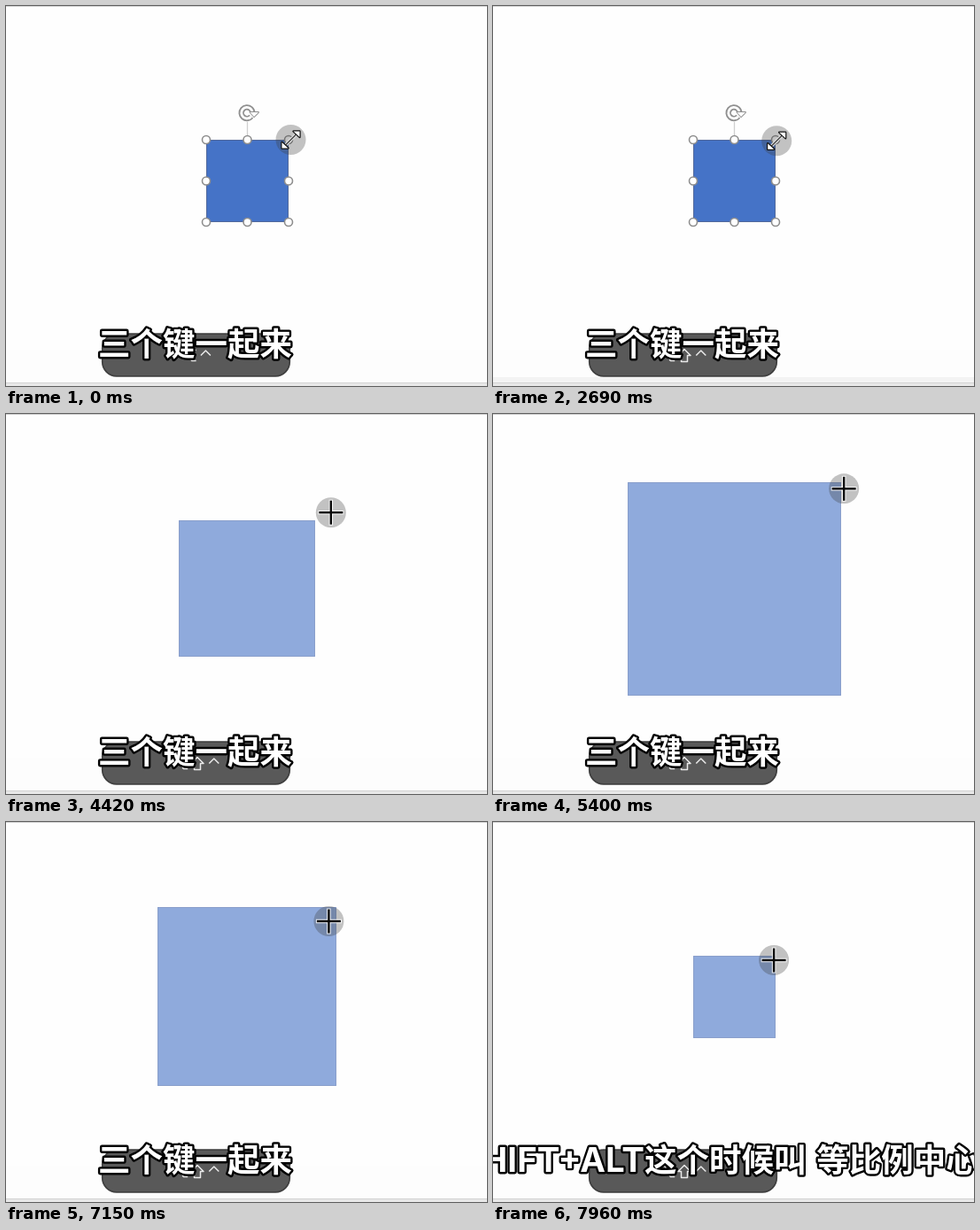
An HTML page with a canvas that plays this animation: 543x429 px, repeating every 7.99 s.

```html
<!DOCTYPE html>
<html lang="zh">
<head>
<meta charset="utf-8">
<style>
  html, body { margin: 0; width: 100%; height: 100%; overflow: hidden; background: #fefefe; }
  canvas { display: block; }
</style>
</head>
<body>
<canvas id="stage" width="543" height="429"></canvas>
<script>
const ctx = document.getElementById('stage').getContext('2d');
const LOOP = 7990;
const CENTER = { x: 272.5, y: 197.5 };
const SMALL = 46.5, GROWN = 113.5, LARGE = 133.5; // half sides of the square
const PRESS = 3750, DRAG = 4150, SLOW = 4800, TURN = 6490;
const CJK = '700 36.5px "Noto Sans CJK SC", "Noto Sans CJK", sans-serif';
const LATIN = '700 38.5px Inter, sans-serif';

const clamp = v => Math.min(1, Math.max(0, v));
const progress = (t, from, to) => clamp((t - from) / (to - from));
const mix = (a, b, k) => a + (b - a) * k;
const smooth = k => k * k * (3 - 2 * k);

function held(t) {
  const since = t < SLOW ? PRESS : t < TURN ? SLOW : TURN + 30;
  const still = t < DRAG || (t >= SLOW && t < 6000) || (t >= TURN + 30 && t < 7150);
  return still ? since + Math.floor((t - since) / 200) * 200 : t;
}

function halfSide(t) {
  if (t < DRAG) return SMALL;
  if (t < SLOW) return mix(SMALL, GROWN, progress(t, 4100, SLOW));
  if (t < TURN) return mix(GROWN, LARGE, progress(t, SLOW, 6160) ** 1.3);
  return mix(LARGE, SMALL, smooth(progress(t, 6550, 8000)));
}

// Horizontal distance of the cursor from the centre, and its slope.
function cursorReach(t, half) {
  if (t < PRESS) return [t < 1990 ? 49 : 47.7, 0.95];
  if (t < DRAG) return [48 + (t - PRESS) * 0.03, 0.95];
  if (t < TURN) return [94.5 + 0.68 * (half - 77.5), 0.915];
  return [4 + 0.87 * half, 0.93];
}

function poseAt(time) {
  const t = held(time);
  const half = halfSide(t);
  const [reach, slope] = cursorReach(t, half);
  return { half, x: CENTER.x + reach, y: CENTER.y - reach * slope };
}

function disc(x, y, r, fill, stroke, width = 1) {
  ctx.beginPath();
  ctx.arc(x, y, r, 0, Math.PI * 2);
  if (fill) { ctx.fillStyle = fill; ctx.fill(); }
  if (stroke) { ctx.strokeStyle = stroke; ctx.lineWidth = width; ctx.stroke(); }
}

function line(points, color, width, close) {
  ctx.beginPath();
  points.forEach(([x, y]) => ctx.lineTo(x, y));
  if (close) ctx.closePath();
  ctx.strokeStyle = color;
  ctx.lineWidth = width;
  ctx.stroke();
}

function band(y, height, color) {
  ctx.fillStyle = color;
  ctx.fillRect(0, y, 543, height);
}

function drawPage(t) {
  band(0, 429, '#fefefe');
  band(0, 1, '#d4d4d4');
  band(388, 37, '#fdfdfd');
  if (t >= 2390 && t < DRAG) band(419, 6, '#f3f3f3');
  band(425, 4, '#e8e8e8');
  band(425, 1, '#d2d2d2');
}

function drawSquare(half, dragging) {
  const x = Math.round(CENTER.x - half), y = Math.round(CENTER.y - half);
  const side = Math.round(half * 2);
  ctx.fillStyle = dragging ? '#8faadc' : '#4573c7';
  ctx.fillRect(x, y, side, side);
  ctx.strokeStyle = dragging ? '#8a9fcb' : '#52699c';
  ctx.lineWidth = 1;
  ctx.strokeRect(x + 0.5, y + 0.5, side - 1, side - 1);
}

function drawHandles(half) {
  const { x, y } = CENTER;
  line([[x, 131], [x, 147]], '#cfcfcf', 1.3);
  for (const dx of [-1, 0, 1])
    for (const dy of [-1, 0, 1])
      if (dx || dy) disc(x + dx * half, y + dy * half, 4.5, '#fff', '#8e8e8e', 1.6);

  // Rotation handle: hollow curved arrow
  for (const [color, width] of [['#8f8f8f', 6.4], ['#fff', 2.8]]) {
    ctx.beginPath();
    ctx.arc(272, 120.7, 6.3, 0.7, Math.PI * 2);
    ctx.strokeStyle = color;
    ctx.lineWidth = width;
    ctx.stroke();
  }
  line([[275.5, 120], [285, 120], [280, 125]], '#8f8f8f', 1.8, true);
  ctx.fillStyle = '#fff';
  ctx.fill();
}

function drawResizeArrow() {
  line([[-6, 6], [6, -6]], '#e6e6e6', 3.5);
  line([[-6, 6], [6, -6]], '#444', 1.4);
  for (const s of [1, -1]) {
    line([[10 * s, -9.5 * s], [10 * s, -3 * s], [3 * s, -9.5 * s]], '#111', 2.4, true);
    ctx.fillStyle = '#fff';
    ctx.fill();
  }
}

function drawCross() {
  for (const [color, width, reach] of [['rgba(255,255,255,.8)', 4.6, 14.5], ['#080808', 2.4, 13.5]]) {
    line([[-reach, 0], [reach, 0]], color, width);
    line([[0, -reach], [0, reach]], color, width);
  }
}

function drawCursor(x, y, pressed) {
  ctx.save();
  ctx.translate(x, y);
  disc(0, 0, 17, 'rgba(60,60,60,.31)');
  if (pressed) drawCross(); else drawResizeArrow();
  ctx.restore();
}

const KEYS = {
  option: 'M-8 -6H-3.5L3 6H8M2 -6H8',
  shift: 'M0 -7L7 0H3.5V7H-3.5V0H-7Z',
  control: 'M-5.5 0L0 -5.5L5.5 0'
};

function drawKeys(names) {
  ctx.beginPath();
  ctx.roundRect(108.8, 370.2, 211.4, 47.6, 16);
  ctx.fillStyle = '#595959';
  ctx.fill();
  ctx.strokeStyle = '#404040';
  ctx.lineWidth = 1.8;
  ctx.stroke();
  names.forEach((name, i) => {
    ctx.save();
    ctx.translate(216 + (i - (names.length - 1) / 2) * 18.8, 394.5);
    ctx.strokeStyle = '#e9e9e9';
    ctx.lineWidth = 1.5;
    ctx.stroke(new Path2D(KEYS[name]));
    ctx.restore();
  });
}

function outlined(text, x, font, align = 'left') {
  ctx.font = font;
  ctx.textAlign = align;
  ctx.strokeStyle = '#000';
  ctx.lineWidth = 4.8;
  ctx.strokeText(text, x, 394.7);
  ctx.fillStyle = '#fff';
  ctx.fillText(text, x, 394.7);
}

function drawCaption(t) {
  if (t < 7350) {
    outlined('三个键一起来', 104, CJK);
  } else if (t >= 7650) {
    outlined('SHIFT+ALT', 171, LATIN, 'right');
    outlined('这个时候叫', 171, CJK);
    outlined('等比例中心缩放', 365.2, CJK);
  }
}

function render(t) {
  const { half, x, y } = poseAt(t);
  const dragging = t >= DRAG;
  drawPage(t);
  drawSquare(half, dragging);
  if (!dragging) drawHandles(half);
  drawCursor(x, y, t >= PRESS);
  drawKeys(t < 300 ? ['option', 'control'] : ['option', 'shift', 'control']);
  drawCaption(t);
}

ctx.lineJoin = 'round';
const start = performance.now();
function frame() {
  render((performance.now() - start) % LOOP);
  requestAnimationFrame(frame);
}
frame();
</script>
</body>
</html>
```
